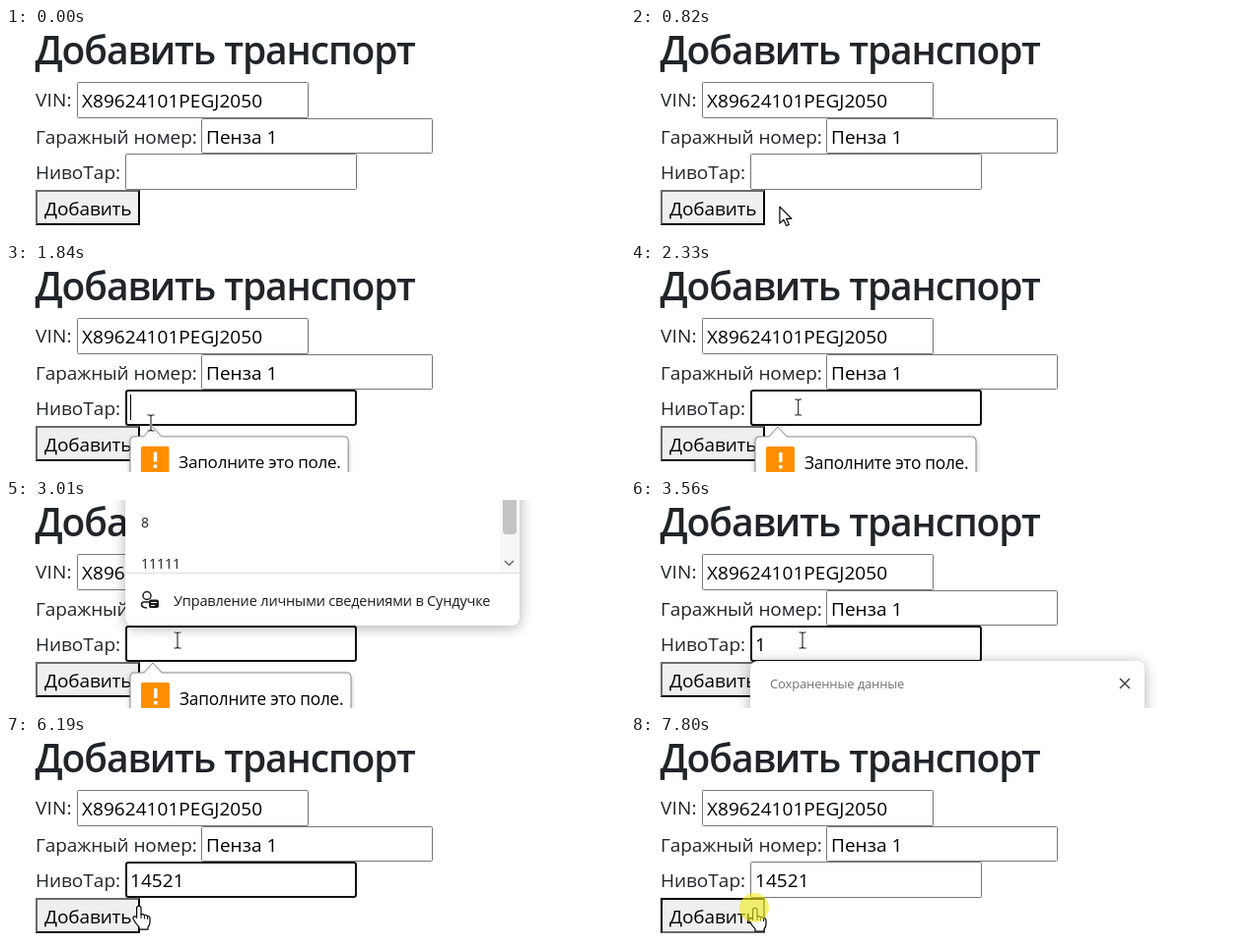
These frames come from a looping animation (628x212 px, 8 s). An HTML page with a canvas:

```html
<!DOCTYPE html>
<html lang="ru">
<head>
<meta charset="utf-8">
<style>
  html, body { margin: 0; width: 100%; height: 100%; overflow: hidden; background: #fff; }
  canvas { display: block; width: 628px; height: 212px; }
</style>
</head>
<body>
<canvas id="stage"></canvas>
<script>
const W = 628, H = 212, LOOP = 8000;
const canvas = document.getElementById('stage');
const ctx = canvas.getContext('2d');
const dpr = window.devicePixelRatio || 1;
canvas.width = W * dpr;
canvas.height = H * dpr;

const FAMILY = '"Open Sans", "Noto Sans", sans-serif';
const INK = '#212529';

// Pointer path: time, x, y
const PATH = [
  [320, 421, 200], [950, 118, 180], [1430, 118, 180], [1840, 147, 162],
  [1980, 147, 162], [2450, 174, 143], [5770, 174, 143], [6190, 135, 174],
  [6540, 129, 175], [6670, 129, 175], [6870, 126, 176]
];
const CARET = [[1290, 1880], [2480, 3010], [4830, 5770], [6300, 6850], [7400, 7800]];
const TYPED = [[3560, '1'], [4090, '145'], [4830, '1452'], [5240, '14521']];

const HAND = new Path2D('M-2.4 1.5a2.2 2.2 0 0 1 4.4 0v6.6q2-1 3.4.6q2-.7 3.2 1q2.3-.2 2.4 2.3v4q0 3-2 4.6v2.6h-9v-2.6q-3.4-3.4-6-8.4q-.5-2.5 2-2.4q1 .5 1.6 1.5z');
const KNUCKLES = new Path2D('M2 8v4M5.4 9v3.5M8.6 10v3');
const ARROW = new Path2D('M0 0v17l4-3.8 2.7 6.2 2.7-1.2-2.7-6H12z');
const BEAM = new Path2D('M-3.5-8h2.5l1 1 1-1h2.5M0-7v14M-3.5 8h2.5l1-1 1 1h2.5');

const within = (t, a, b) => t >= a && t < b;
const pressed = t => within(t, 1150, 1290) || t >= 7800;
const ramp = (t, a, b) => Math.min(1, Math.max(0, (t - a) / (b - a)));
const smooth = k => k * k * (3 - 2 * k);

function text(str, x, y, size, color = INK, weight = 400, spacing = 0) {
  ctx.font = `${weight} ${size}px ${FAMILY}`;
  ctx.letterSpacing = spacing + 'px';
  ctx.fillStyle = color;
  ctx.fillText(str, x, y);
}

function rect(x, y, w, h, color) {
  ctx.fillStyle = color;
  ctx.fillRect(x, y, w, h);
}

function rounded(x, y, w, h, r, fill) {
  ctx.beginPath();
  ctx.roundRect(x, y, w, h, r);
  ctx.fillStyle = fill;
  ctx.fill();
}

function line(path, color, width) {
  ctx.strokeStyle = color;
  ctx.lineWidth = width;
  ctx.stroke(path);
}

function shadow(color, blur, dy) {
  ctx.shadowColor = color;
  ctx.shadowBlur = blur * dpr;
  ctx.shadowOffsetY = dy * dpr;
}

function field(x, y, h, value, focused) {
  const inset = focused ? 1 : 0.5;
  rounded(x + inset, y + inset, 235 - 2 * inset, h - 2 * inset, focused ? 2 : 1, '#fff');
  ctx.strokeStyle = focused ? '#101010' : '#767676';
  ctx.lineWidth = 2 * inset;
  ctx.stroke();
  text(value, x + 5, y + 26, 19, '#000', 400, 0.05);
}

function button(down) {
  const dark = '#000', light = '#6b6b6b';
  rect(30, 165, 106, 36, down ? light : dark);
  ctx.fillStyle = down ? dark : light;
  ctx.fill(new Path2D('M30 201V165H136L134 167H32V199Z'));
  rect(32, 167, 102, 32, '#efefef');
  text('Добавить', 39, 191, 19, '#000', 400, -0.1);
}

function form(t) {
  const typed = TYPED.filter(([at]) => t >= at).pop();
  const value = typed ? typed[1] : '';
  text('Добавить транспорт', 29.5, 37, 39, INK, 600, -1.13);
  text('VIN:', 30, 80, 19, INK, 400, 0.2);
  field(72, 55, 37, 'X89624101PEGJ2050');
  text('Гаражный номер:', 30, 118, 19, INK, 400, -0.1);
  field(198, 92, 36, 'Пенза 1');
  text('НивоТар:', 30, 154, 19);
  field(121, 128, 37, value, within(t, 1290, 7800));
  if (CARET.some(([a, b]) => within(t, a, b))) {
    rect(126 + Math.round(value.length * 10.8), 133, 1, 26, '#000');
  }
  button(pressed(t));
}

function bubble(t) {
  const alpha = ramp(t, 1640, 1780) * (1 - ramp(t, 3060, 3160));
  if (!alpha) return;
  const scale = 0.95 + 0.05 * ramp(t, 1640, 1910);
  ctx.save();
  ctx.globalAlpha = alpha;
  ctx.translate(126, 166);
  ctx.scale(scale, scale);
  const shape = new Path2D('M4 10H14L23 0L32 10H220Q224 10 224 14V70H0V14Q0 10 4 10Z');
  shadow('rgba(0,0,0,.35)', 5, 2);
  ctx.fillStyle = '#fff';
  ctx.fill(shape);
  ctx.shadowColor = 'transparent';
  line(shape, '#8c8c8c', 1);
  rounded(11, 20, 29, 29, 2, '#ff8f00');
  rect(24, 26, 3.5, 10, '#fff');
  rect(24, 39, 3.5, 3.5, '#fff');
  text('Заполните это поле.', 50, 43, 17.3, '#000', 400, -0.25);
  ctx.restore();
}

function panel(y, h, alpha, content) {
  if (!alpha) return;
  ctx.save();
  ctx.globalAlpha = alpha;
  shadow('rgba(0,0,0,.32)', 14, 2);
  rounded(121, y, 400, h, 8, '#fff');
  ctx.shadowColor = 'transparent';
  content();
  ctx.restore();
}

function suggestions() {
  text('8', 137, 28, 14, '#1b1b1b');
  text('11111', 137, 70, 14, '#1b1b1b');
  rect(501, 0, 20, 74, '#f7f7f7');
  rounded(504, -20, 14, 55, 4, '#c4c4c4');
  line(new Path2D('M506 62l4.5 4.5 4.5-4.5'), '#555', 1.2);
  rect(121, 74, 400, 1, '#dcdcdc');
  line(new Path2D('M147 97.500a4 4 0 1 0-8 0a4 4 0 1 0 8 0M145 104h-5q-2.500 0-2.500 2.500q0 3 5.500 3.500'), '#1b1b1b', 1.5);
  rounded(145, 101.5, 10, 8.5, 2, '#1b1b1b');
  rect(147, 104, 6, 1, '#fff');
  rect(147, 107, 4, 1, '#fff');
  text('Управление личными сведениями в Сундучке', 170, 108, 14.5, '#1b1b1b', 400, -0.15);
}

function savedData() {
  text('Сохраненные данные', 141, 192, 13, '#767676', 400, -0.15);
  line(new Path2D('M496 182l10 10m0-10l-10 10'), '#444', 1.5);
}

function pointer(t) {
  if (t < PATH[0][0]) return;
  let [, x, y] = PATH[PATH.length - 1];
  const next = PATH.findIndex(p => p[0] > t);
  if (next > 0) {
    const [t0, x0, y0] = PATH[next - 1], [t1, x1, y1] = PATH[next];
    const k = smooth(ramp(t, t0, t1));
    x = x0 + (x1 - x0) * k;
    y = y0 + (y1 - y0) * k;
  }
  ctx.save();
  ctx.translate(x, y);
  ctx.lineJoin = 'round';
  if (x > 121 && y < 165) {
    line(BEAM, '#fff', 2.5);
    line(BEAM, '#222', 1.1);
  } else {
    const hand = x < 136;
    const shape = hand ? HAND : ARROW;
    ctx.fillStyle = '#fff';
    ctx.fill(shape);
    line(shape, '#000', 1.2);
    if (hand) line(KNUCKLES, '#000', 1);
  }
  // Click highlight tints the pointer too
  if (pressed(t)) {
    ctx.beginPath();
    ctx.arc(-1, -1, 15, 0, 2 * Math.PI);
    ctx.fillStyle = 'rgba(240,236,30,.62)';
    ctx.fill();
  }
  ctx.restore();
}

function draw(t) {
  ctx.setTransform(dpr, 0, 0, dpr, 0, 0);
  rect(0, 0, W, H, '#fff');
  form(t);
  bubble(t);
  panel(-60, 188, t < 3560 ? ramp(t, 2400, 2600) : 0, suggestions);
  panel(164, 120, t < 3560 ? 0 : t < 4830 ? 1 : 0.82 * (1 - ramp(t, 4830, 5040)), savedData);
  pointer(t);
}

const start = performance.now();
function tick() {
  draw((performance.now() - start) % LOOP);
  requestAnimationFrame(tick);
}
tick();
</script>
</body>
</html>
```
